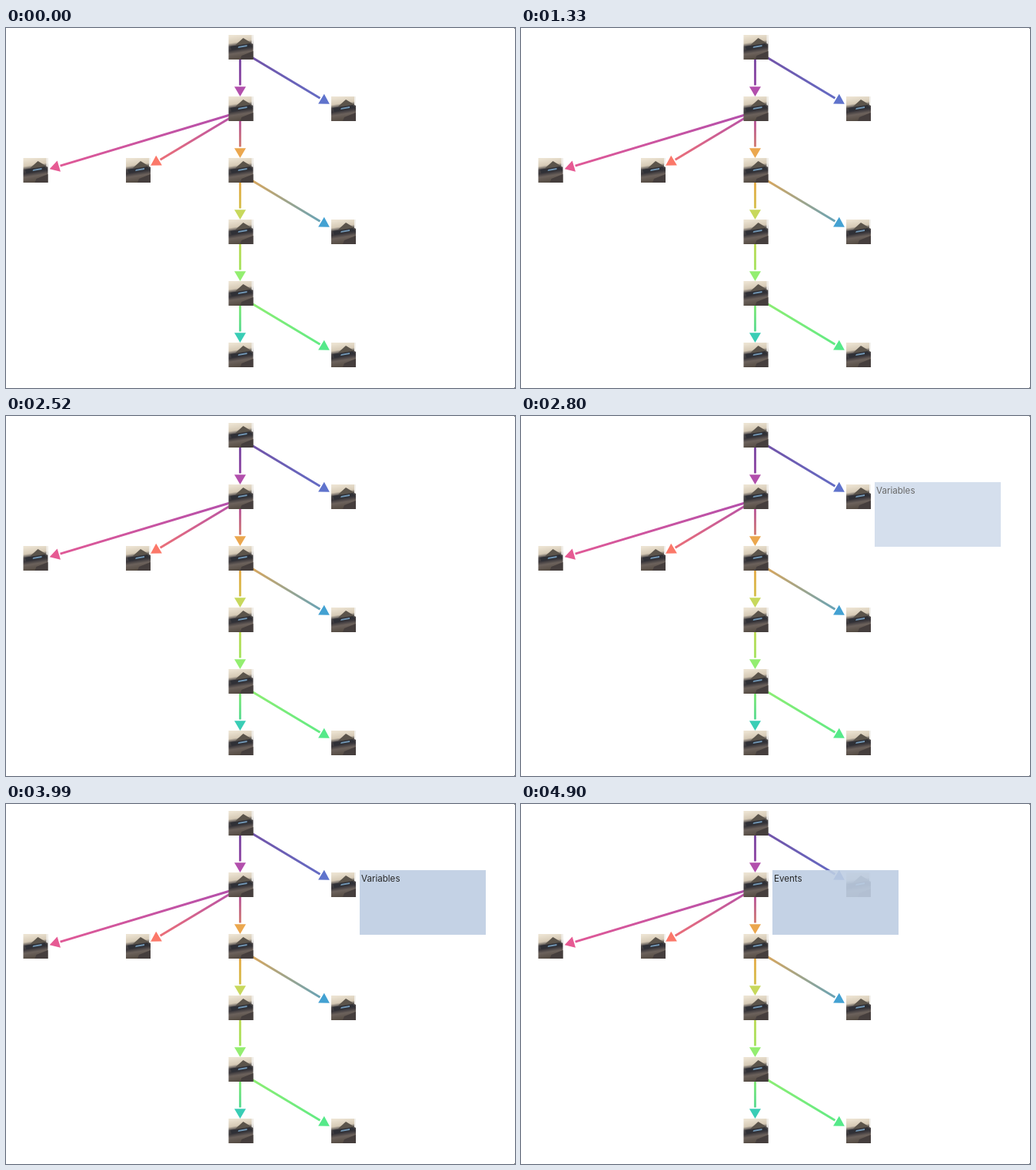
These frames come from a looping animation (662x468 px, 4.97 s). An HTML page with a canvas:

```html
<!DOCTYPE html>
<html lang="en">
<head>
<meta charset="utf-8">
<title>Node graph with tooltips</title>
<style>
  html, body { margin: 0; width: 662px; height: 468px; overflow: hidden; background: #fff; }
  canvas { display: block; }
  #tip {
    position: absolute; box-sizing: border-box; width: 164px; height: 84px; padding: 4px 2px;
    background: rgb(190, 206, 227); color: #111; font: 11.6px/14px Inter, sans-serif; opacity: 0;
  }
</style>
</head>
<body>
<canvas id="stage" width="662" height="468"></canvas>
<div id="tip"></div>
<script>
const ctx = document.getElementById('stage').getContext('2d');
const tip = document.getElementById('tip');
const LOOP = 4970, COL = 133.5, ROW = 80, SIZE = 32;

// Each node is its column followed by its children, which sit one row lower.
const tree = [2, [2, [0], [1], [2, [2, [2, [3], [2]]], [3]]], [3]];
const nodes = [];
function collect([col, ...children], row, parent) {
  const node = { x: 38 + col * COL, y: 25 + row * ROW, parent };
  nodes.push(node);
  children.forEach(child => collect(child, row + 1, node));
}
collect(tree, 0);

// Cyclic cubehelix rainbow, slightly muted.
function rainbow(t) {
  const d = Math.abs(t - .5), light = .8 - .9 * d;
  const amp = (1.5 - 1.5 * d) * light * (1 - light);
  const angle = (360 * t + 20) * Math.PI / 180;
  const c = amp * Math.cos(angle), s = amp * Math.sin(angle);
  const rgb = [1.78277 * s - .14861 * c, -.29227 * c - .90649 * s, 1.97294 * c];
  return `rgb(${rgb.map(v => 255 * (.06 + .94 * (light + .85 * v)))})`;
}
nodes.forEach((node, i) => node.color = rainbow(i / nodes.length));

function gradient(x0, y0, x1, y1, ...stops) {
  const g = ctx.createLinearGradient(x0, y0, x1, y1);
  stops.forEach(([at, color]) => g.addColorStop(at, color));
  return g;
}

function polygon(color, ...p) {
  ctx.fillStyle = color;
  ctx.beginPath();
  for (let i = 0; i < p.length; i += 2) ctx.lineTo(p[i], p[i + 1]);
  ctx.closePath();
  ctx.fill();
}

function drawLink({ x, y, color, parent }) {
  const dx = x - parent.x, dy = y - parent.y, length = Math.hypot(dx, dy);
  ctx.save();
  ctx.translate(parent.x - .5, parent.y + 4);
  ctx.rotate(Math.atan2(dy, dx));
  ctx.strokeStyle = gradient(0, 0, length, 0, [0, parent.color], [1, color]);
  ctx.lineWidth = 3;
  ctx.beginPath();
  ctx.moveTo(0, 0);
  ctx.lineTo(length - 34.5, 0);
  ctx.stroke();
  polygon(color, length - 20, 0, length - 32.7, -7.5, length - 32.7, 7.5);
  ctx.restore();
}

// Pale wall, dark device with a lit screen, brown table.
function drawPhoto({ x, y }) {
  ctx.save();
  ctx.translate(x + .5 - SIZE / 2, y - SIZE / 2);
  ctx.fillStyle = gradient(12, 0, 17, SIZE, [0, '#ece3d2'], [.28, '#d6cab6'], [.42, '#4a4647'],
    [.58, '#3a373b'], [.72, '#6c625c'], [1, '#51483f']);
  ctx.fillRect(0, 0, SIZE, SIZE);
  polygon('#5b544b', 19, 4, 29, 10, 29, 14, 9, 13);
  polygon('#2f3036', 2, 15, 28, 11, 31, 15, 4, 20);
  polygon('#7397b5', 13, 15, 24, 13, 24, 15, 12, 17);
  polygon('#453e3d', 17, 27, 32, 21, 32, 32, 15, 32);
  polygon('#f2f0ec', 30, 0, 32, 0, 32, 12, 30, 11);
  ctx.restore();
}

nodes.slice(1).forEach(drawLink);
nodes.forEach(drawPhoto);
ctx.fillStyle = '#777';
for (const y of [0, 467]) ctx.fillRect(661, y, 1, 1);

const stops = [
  { start: 2685, label: 'Variables', left: 460, top: 86 },
  { start: 4130, label: 'Tilvarin', left: 327, top: 6 },
  { start: 4760, label: 'Events', left: 327, top: 86 }
];
const cubicInOut = t => t < .5 ? 4 * t ** 3 : 1 - 4 * (1 - t) ** 3;

function frame(now) {
  const t = now % LOOP;
  const { start, label, left, top } = stops.findLast(s => t >= s.start) || stops[0];
  const fade = start > stops[0].start ? 1 : Math.min(1, Math.max(0, (t - start) / 200));
  tip.textContent = label;
  tip.style.left = left + 'px';
  tip.style.top = top + 'px';
  tip.style.opacity = .9 * cubicInOut(fade);
  requestAnimationFrame(frame);
}
requestAnimationFrame(frame);
</script>
</body>
</html>
```
